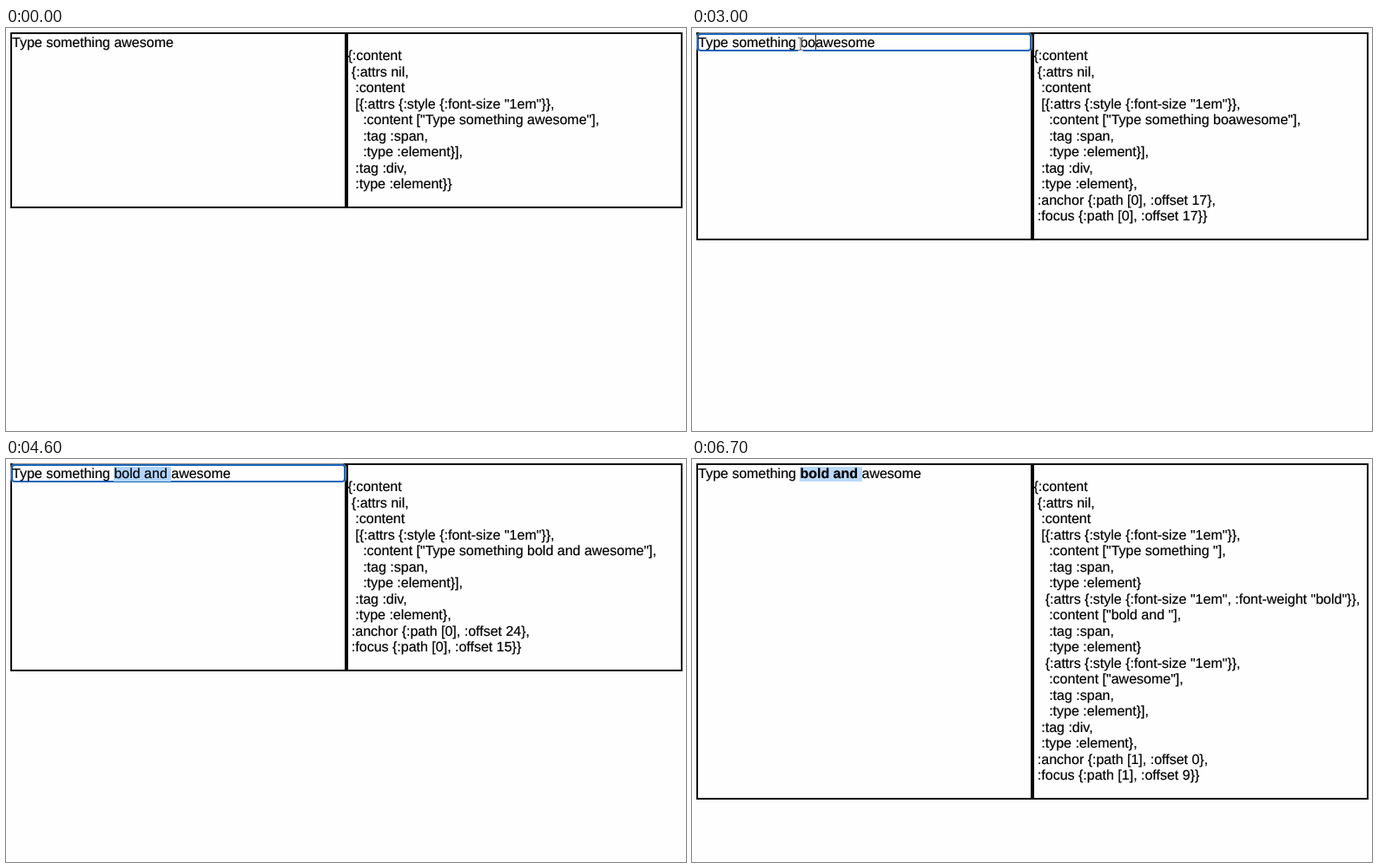
An HTML page that plays this animation: 783 px wide and 465 px high, repeating every 6800 ms.

```html
<!DOCTYPE html>
<html lang="en">
<head>
<meta charset="utf-8">
<title>Rich text editor and its document model</title>
<style>
  html, body { margin: 0; width: 100%; height: 100%; overflow: hidden; background: #fefefe; }
  body { position: relative; color: #000; font: 16px "Liberation Sans", Arial, sans-serif; text-rendering: geometricPrecision; -webkit-text-stroke: .2px #000; }
  body > * { position: absolute; box-sizing: border-box; margin: 0; }
  #panel { left: 5px; top: 5px; width: 774px; border: 2px solid #000; }
  #bar { left: 390px; top: 5px; width: 4px; background: #000; }
  #ring { left: 6px; top: 6px; width: 385px; height: 21px; border: 2px solid #1c66bc; border-radius: 4px; box-shadow: 0 0 0 1px #fff8; }
  #editor { left: 7px; top: 8px; line-height: 19px; white-space: pre; }
  #editor mark { color: inherit; background: #b0d4fd; }
  #editor mark.blurred { background: #bbd9fa; }
  #editor i { position: absolute; width: 1px; height: 17px; background: #222; }
  #model { left: 393.4px; top: 24px; font: inherit; line-height: 18.5px; white-space: pre; }
  svg { left: 0; top: 0; overflow: visible; }
</style>
</head>
<body>
<div id="panel"></div>
<div id="bar"></div>
<div id="ring"></div>
<div id="editor"></div>
<pre id="model"></pre>
<svg id="pointer" width="12" height="18">
  <path id="arrow" d="M0 0V14L3.3 11 5.6 16.4 8 15.4 5.7 10.2H10.3Z" stroke="#fff"/>
  <g id="beam" fill="none">
    <path d="M-3-7Q0-7 0-5Q0-7 3-7M0-5V6M-3 8Q0 8 0 6Q0 8 3 8" stroke="#fff" stroke-width="2.4"/>
    <path d="M-3-7Q0-7 0-5Q0-7 3-7M0-5V6M-3 8Q0 8 0 6Q0 8 3 8" stroke="#555"/>
  </g>
</svg>
<script>
const LOOP = 6800, STEP = 100;
const HEAD = 'Type something ', TYPED = 'bold and ', TAIL = 'awesome';
const KEYS = [2900, 3000, 3100, 3200, 3300, 3500, 3600, 3700, 3800];
const $ = id => document.getElementById(id);
const mix = (a, b, k) => a + (b - a) * k;
const within = (t, from, to) => t >= from && t < to;

const element = (text, style = '') =>
  `{:attrs {:style {:font-size "1em"${style}}},\n    :content ["${text}"],\n    :tag :span,\n    :type :element}`;

function modelText(spans, anchor, focus) {
  const range = anchor
    ? `,\n :anchor {:path [${anchor[0]}], :offset ${anchor[1]}},\n :focus {:path [${focus[0]}], :offset ${focus[1]}}`
    : '';
  return `{:content\n {:attrs nil,\n  :content\n  [${spans.join('\n   ')}],\n  :tag :div,\n  :type :element}${range}}`;
}

function modelAt(t, typed) {
  if (t >= 5300) {
    const spans = [element(HEAD), element(TYPED, ', :font-weight "bold"'), element(TAIL)];
    return t < 5400 ? modelText(spans, [1, 9], [1, 0]) : modelText(spans, [1, 0], [1, 9]);
  }
  const spans = [element(HEAD + typed + TAIL)];
  if (t < 2100) return modelText(spans);
  const end = HEAD.length + typed.length;
  const focus = t >= 4600 ? 15 : t >= 4400 ? 20 : end;
  return modelText(spans, [0, end], [0, focus]);
}

function editorAt(t, typed) {
  if (t >= 4300) {
    const cut = t < 4600 ? 5 : 0;
    const mark = `<mark class="${t >= 6700 ? 'blurred' : ''}">${TYPED.slice(cut)}</mark>`;
    return HEAD + TYPED.slice(0, cut) + (t >= 5300 ? `<b>${mark}</b>` : mark) + TAIL;
  }
  const caret = within(t, 1900, 2500) || t >= 2900 ? '<i></i>' : '';
  return HEAD + typed + caret + TAIL;
}

// Pointer position, or null while it is out of sight
function pointerAt(t) {
  if (within(t, 600, 1300)) {
    const k = (t - 600) / 600, e = k * (2 - k);
    return [mix(338, 99, e), mix(450, 34, e)];
  }
  if (within(t, 1300, 4100)) {
    const k = Math.min(1, Math.max(0, (t - 1400) / 400));
    return [mix(88.5, 125, k), 18];
  }
  if (within(t, 6000, 6500)) {
    const k = (t - 6000) / 450;
    return [mix(125, 300, k * k), mix(18, 465, k * k)];
  }
  return null;
}

function draw(t) {
  const typed = TYPED.slice(0, KEYS.filter(k => k <= t).length);
  const model = modelAt(t, typed);
  const height = Math.ceil(model.split('\n').length * 18.5 + 36) + 'px';
  $('model').textContent = model;
  $('editor').innerHTML = editorAt(t, typed);
  $('panel').style.height = $('bar').style.height = height;
  $('ring').hidden = !within(t, 1900, 6700);

  const at = pointerAt(t);
  $('pointer').style.display = at ? '' : 'none';
  if (!at) return;
  const overText = at[1] < 26;
  $('pointer').style.transform = `translate(${at[0]}px, ${at[1]}px)`;
  $('beam').style.display = overText ? '' : 'none';
  $('arrow').style.display = overText ? 'none' : '';
}

const start = performance.now();
let last = -1;
function tick() {
  const t = Math.floor((performance.now() - start) % LOOP / STEP) * STEP;
  if (t !== last) draw(last = t);
  requestAnimationFrame(tick);
}
tick();
</script>
</body>
</html>
```
